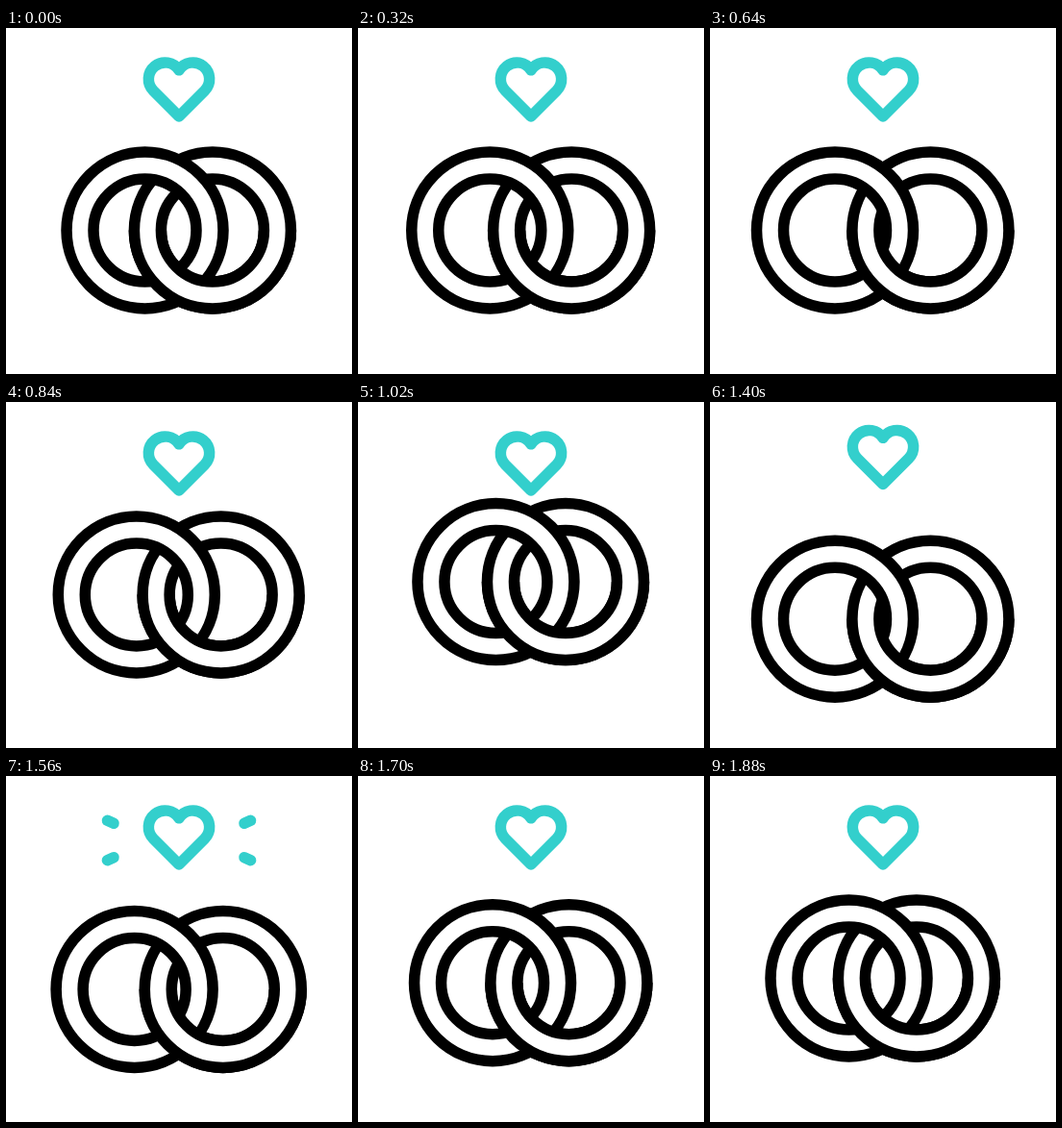
An HTML page for the animation above (2.48 s loop, 360 by 360 pixels).

```html
<!DOCTYPE html>
<html lang="en">
<head>
<meta charset="utf-8">
<title>Linked rings</title>
<style>
  html, body { margin: 0; width: 100%; height: 100%; overflow: hidden; background: #fff; }
  svg { display: block; width: 100vw; height: 100vh; }
</style>
</head>
<body>
<svg viewBox="0 0 360 360" fill="none" stroke-width="11.5" stroke-linecap="round" stroke-linejoin="round">
  <defs>
    <g id="ring">
      <circle r="67.5" stroke="#fff" stroke-width="28"/>
      <circle r="81.5" stroke="#000"/>
      <circle r="53.5" stroke="#000"/>
    </g>
    <mask id="lower" maskUnits="userSpaceOnUse" x="-90" y="-90" width="180" height="180">
      <rect x="-90" y="0" width="180" height="90" fill="#fff"/>
    </mask>
  </defs>
  <!-- The left ring passes over the right one at the top and under it at the bottom. -->
  <g id="rings">
    <use class="right" href="#ring"/>
    <use class="left" href="#ring"/>
    <g class="right"><g mask="url(#lower)"><use href="#ring"/></g></g>
  </g>
  <g stroke="#33cfcc">
    <path id="heart" d="M180 92 153.3 65.2A17.2 17.2 0 1 1 180 43.8A17.2 17.2 0 1 1 206.7 65.2Z"/>
    <path id="sparks"/>
  </g>
</svg>
<script>
const LOOP = 2480, STEP = 20;
const REST_Y = 210.5, LEFT_X = 144.5, RIGHT_X = 214.9;

// Keyframes as [ms, value]
const spread = [[0, 0], [640, 14.5], [1100, 0], [1400, 14.5], [1880, 0]];
const lift = [[640, 0], [1100, -25.3], [1400, 15.2], [1880, 0]];
const heartDrop = [[1100, 0], [1260, 12.6], [1430, -8], [1550, 0]];
const sparkHead = [[1400, 0], [1590, 24]];
const sparkTail = [[1460, 0], [1625, 24]];

const ease = p => (1 - Math.cos(Math.PI * p)) / 2;

function valueAt(keys, t) {
  if (t <= keys[0][0]) return keys[0][1];
  for (let i = 1; i < keys.length; i++) {
    const [t0, a] = keys[i - 1], [t1, b] = keys[i];
    if (t < t1) return a + (b - a) * ease((t - t0) / (t1 - t0));
  }
  return keys[keys.length - 1][1];
}

const move = (el, x, y) => el.setAttribute("transform", `translate(${x} ${y})`);
const rings = document.getElementById("rings");
const left = rings.querySelectorAll(".left");
const right = rings.querySelectorAll(".right");
const heart = document.getElementById("heart");
const sparks = document.getElementById("sparks");

function sparkPath(head, tail) {
  if (head - tail < 0.1) return "";
  let d = "";
  for (const sx of [-1, 1]) for (const sy of [-1, 1]) {
    const point = s => `${180 + sx * (52 + s)} ${67 + sy * (10.5 + s * 0.45)}`;
    d += `M${point(tail)}L${point(head)}`;
  }
  return d;
}

function draw(t) {
  const shift = valueAt(spread, t);
  move(rings, 0, REST_Y + valueAt(lift, t));
  left.forEach(el => move(el, LEFT_X - shift, 0));
  right.forEach(el => move(el, RIGHT_X + shift, 0));
  move(heart, 0, valueAt(heartDrop, t));
  sparks.setAttribute("d", sparkPath(valueAt(sparkHead, t), valueAt(sparkTail, t)));
}

let start;
function tick(now) {
  start ??= now;
  const t = Math.max(0, now - start) % LOOP;
  draw(Math.floor(t / STEP) * STEP);
  requestAnimationFrame(tick);
}
draw(0);
requestAnimationFrame(tick);
</script>
</body>
</html>
```
